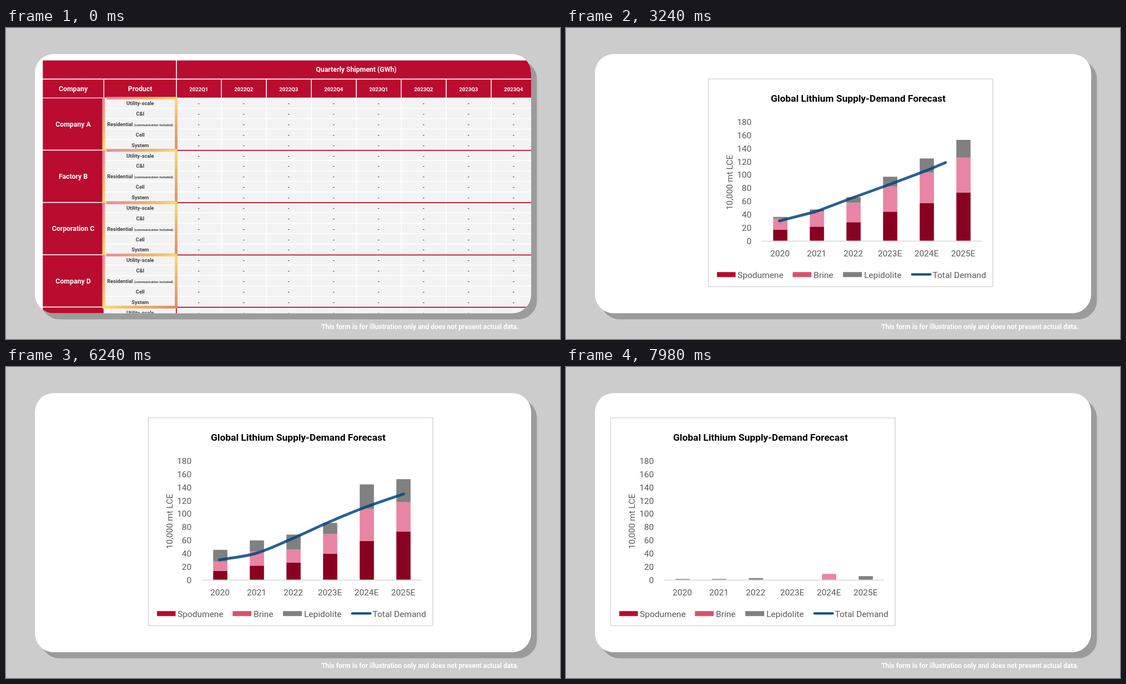
Recreate the animation shown at these times as an HTML page. Size 998x561 px, loop 8 s.

```html
<!DOCTYPE html>
<html lang="en">
<head>
<meta charset="utf-8">
<title>Report forms</title>
<style>
html, body { margin: 0; width: 100%; height: 100%; overflow: hidden; background: #ccc; }
svg { display: block; width: 100%; height: 100%; }
text { font-family: Roboto, "Open Sans", sans-serif; text-anchor: middle; }
.head { font-weight: 700; font-size: 12.3px; fill: #fff; }
.quarter { font-weight: 700; font-size: 9.6px; fill: #fff; }
.cell { font-weight: 700; font-size: 9.2px; fill: #404040; }
.note { font-size: 6px; }
.label { font-size: 15.5px; fill: #595959; }
.start { text-anchor: start; }
.end { text-anchor: end; }
</style>
</head>
<body>
<svg viewBox="0 0 998 561">
  <defs>
    <clipPath id="card"><rect x="52" y="47" width="894" height="467.5" rx="34"/></clipPath>
    <clipPath id="wipe"><rect id="wipeBox" x="0" y="0" width="998" height="561"/></clipPath>
    <linearGradient id="glow" x1="0" y1="0" x2="1" y2="1">
      <stop offset="0" stop-color="#e887a3"/>
      <stop offset=".3" stop-color="#f0b06b"/>
      <stop offset=".5" stop-color="#fbdb6c"/>
      <stop offset=".7" stop-color="#f2b565"/>
      <stop offset="1" stop-color="#e58a63"/>
    </linearGradient>
  </defs>
  <rect width="998" height="561" fill="#ccc"/>
  <rect x="62.5" y="58" width="894" height="467.5" rx="34" fill="#9b9b9b"/>
  <rect x="52" y="47" width="894" height="467.5" rx="34" fill="#fff"/>
  <text class="start" x="568" y="542.5" font-size="12.1" font-weight="700" fill="#fff">This form is for illustration only and does not present actual data.</text>
  <g clip-path="url(#card)">
    <g id="table" clip-path="url(#wipe)"></g>
    <g id="chart"></g>
  </g>
</svg>
<script>
const $ = id => document.getElementById(id);
const LOOP = 8000, STEP = 30;
const RED = '#b90c2f';

const rect = (x, y, w, h, fill) => `<rect x="${x}" y="${y}" width="${w}" height="${h}" fill="${fill}"/>`;
const text = (cls, x, y, str, attrs = '') => `<text class="${cls}" x="${x}" y="${y}" ${attrs}>${str}</text>`;

// ---- Table ----
const TOP = 126.6, BLOCK = 94.33, ROW = BLOCK / 5, COL = 81;
const companies = ['Company A', 'Factory B', 'Corporation C', 'Company D', ''];
const products = ['Utility-scale', 'C&amp;I',
  'Residential <tspan class="note">(communication included)</tspan>', 'Cell', 'System'];

function buildTable() {
  let s = rect(66.3, 58.5, 239.9, 32.8, RED) + rect(307.8, 58.5, 640, 32.8, RED)
    + rect(66.3, 93, 109.2, 32.6, RED) + rect(177, 93, 129.2, 32.6, RED)
    + text('head', 631, 79.3, 'Quarterly Shipment (GWh)')
    + text('head', 121, 114.3, 'Company') + text('head', 241.5, 114.3, 'Product');
  for (let c = 0; c < 8; c++) {
    const x = 307.8 + c * COL;
    s += rect(x, 93, COL - 1.6, 32.6, RED)
      + text('quarter', 347.3 + c * COL, 113.9, `${2022 + (c >> 2)}Q${c % 4 + 1}`);
  }
  companies.forEach((name, b) => {
    const y = TOP + b * BLOCK;
    s += rect(66.3, y + .2, 109.5, BLOCK - 1.6, RED) + text('head', 121, y + 51.2, name);
    products.forEach((product, r) => {
      const top = y + r * ROW, base = top + 12.7;
      s += rect(176.4, top, 130, ROW - 1.6, '#f3f3f3') + text('cell', 241.8, base, product);
      for (let c = 0; c < 8; c++) {
        s += rect(307.8 + c * COL, top, COL - 1.6, ROW - 1.6, '#f3f3f3')
          + text('cell', 347.3 + c * COL, base, '-', 'font-size="11"');
      }
    });
  });
  s += rect(306, 125.8, 1.8, 389, RED);
  for (let b = 1; b < 5; b++) s += rect(176, TOP + b * BLOCK - 1.1, 772, 1.8, RED);
  for (let b = 0; b < 4; b++) {
    s += `<path class="frame" d="M175.8 ${TOP + b * BLOCK}h130.7v93.9h-130.7z" pathLength="1"
      fill="none" stroke="url(#glow)" stroke-width="4.8"/>`;
  }
  $('table').innerHTML = s;
}

// ---- Chart ----
const BASE = 383.8, PITCH = 66;
const barColors = ['#8a0221', '#e885a4', '#808080'];
// Each state: three stacked segment heights, then the demand line's y values.
const first = {
  bars: [[20, 25.5, 33.5, 52.5, 68, 87], [20, 27, 35, 45.5, 55, 63], [3, 4, 10, 17.5, 25.5, 32]],
  line: [348, 331, 306, 282, 257, 229], bend: 0 };
const second = {
  bars: [[10, 33, 21, 72, 51, 102], [32, 27, 18.5, 25, 97.5, 41], [13, 13, 45, 6.5, 20.5, 26]],
  line: [348, 329, 304, 284, 260, 229], bend: 1 };
const third = {
  bars: [[16, 25.5, 31, 47, 70, 87], [17, 25.5, 23.5, 35.5, 58, 53], [21, 20, 27, 20, 44, 41.5]],
  line: [348, 336, 309, 279, 252, 229], bend: 1 };
const none = [0, 0, 0, 0, 0, 0];
const empty = { ...first, bars: [none, none, none] };
const low = { ...first, bars: [none, [0, 0, 0, 0, 10.5, 0], [1.5, 1.5, 3, 0, 0, 6.5]] };
const keys = [[0, empty], [2610, empty], [3060, first], [3450, first], [5160, second],
  [6240, third], [7470, first], [7680, first], [7980, low], [LOOP, low]];

function buildChart() {
  let s = '<rect x="256.4" y="91.7" width="512.4" height="374.8" fill="#fff" stroke="#d9d9d9" stroke-width="1.6"/>'
    + text('start', 369, 132.6, 'Global Lithium Supply-Demand Forecast', 'font-size="17.4" font-weight="700"')
    + text('label', 0, 0, '10,000 mt LCE', 'transform="translate(299.5 278.5) rotate(-90)"');
  for (let i = 0; i < 10; i++) s += text('label end', 334.3, 389.7 - i * 23.85, i * 20);
  for (let i = 0; i < 6; i++) {
    s += text('label', 385.5 + i * PITCH, 411.6, 2020 + i + (i > 2 ? 'E' : ''));
    for (const color of barColors) s += `<rect class="bar" x="${373.2 + i * PITCH}" width="25.6" fill="${color}"/>`;
  }
  s += rect(353, 383.7, 396, 1.6, '#d9d9d9')
    + rect(272, 440.3, 33.5, 9, '#b80a2b') + text('label start', 309, 450.6, 'Spodumene')
    + rect(408.3, 440.3, 33.8, 9, '#d9506e') + text('label start', 446, 450.6, 'Brine')
    + rect(499, 440.3, 34, 9, '#808080') + text('label start', 537, 450.6, 'Lepidolite')
    + '<path d="M623.5 444.6h33" stroke="#004a80" stroke-width="4" stroke-linecap="round"/>'
    + text('label start', 660.5, 450.6, 'Total Demand')
    + '<path id="demand" pathLength="1" fill="none" stroke="#004680" stroke-opacity=".85" stroke-width="5" stroke-linecap="round" stroke-linejoin="round"/>';
  $('chart').innerHTML = s;
}

// ---- Motion ----
const ramp = (t, a, b) => Math.min(1, Math.max(0, (t - a) / (b - a)));
const mix = (a, b, k) => a + (b - a) * k;
const smooth = u => u * u * (3 - 2 * u);

// cubic-bezier(.5, 0, .5, 1)
function easeStrong(u) {
  let lo = 0, hi = 1;
  for (let i = 0; i < 20; i++) {
    const s = (lo + hi) / 2;
    if (1.5 * s * (1 - s) + s ** 3 < u) lo = s; else hi = s;
  }
  return smooth(lo);
}

function curve(ys, bend) {
  const x = i => 384.5 + i * 66.3;
  const slope = i => (ys[Math.min(5, i + 1)] - ys[Math.max(0, i - 1)]) / (i % 5 ? 2 : 1);
  let d = `M${x(0)} ${ys[0]}`;
  for (let i = 0; i < 5; i++) {
    const chord = ys[i + 1] - ys[i];
    d += `C${x(i + 1 / 3)} ${ys[i] + mix(chord, slope(i), bend) / 3} `
      + `${x(i + 2 / 3)} ${ys[i + 1] - mix(chord, slope(i + 1), bend) / 3} ${x(i + 1)} ${ys[i + 1]}`;
  }
  return d;
}

function drawTable(t) {
  const erased = .012 + t * .000614 + t * t * 8.7e-8;
  for (const frame of frames) {
    frame.style.display = erased < .999 ? '' : 'none';
    frame.setAttribute('stroke-dasharray', '1 2');
    frame.setAttribute('stroke-dashoffset', -Math.min(1, erased));
  }
  $('wipeBox').setAttribute('width', mix(947, 66, easeStrong(ramp(t, 1620, 2040))));
}

function drawChart(t) {
  const k = keys.findIndex(([time], i) => i < keys.length - 1 && t < keys[i + 1][0]);
  const [t0, a] = keys[k], [t1, b] = keys[k + 1];
  const u = ramp(t, t0, t1), e = smooth(u);
  const lively = t > 3450 && t < 7470 ? .15 * Math.sin(Math.PI * u) : 0;

  for (let i = 0; i < 6; i++) {
    let y = BASE;
    for (let r = 0; r < 3; r++) {
      const sway = 1 + lively * Math.sin(4 * Math.PI * u + i + 2 * r);
      const h = mix(a.bars[r][i], b.bars[r][i], e) * sway;
      y -= h;
      bars[i * 3 + r].setAttribute('y', y);
      bars[i * 3 + r].setAttribute('height', h);
    }
  }

  const grown = 1 - (1 - ramp(t, 2850, 3420)) ** 2;
  const shown = grown - ramp(t, 7500, 7872) ** 2;
  const demand = $('demand');
  demand.style.display = shown > .002 ? '' : 'none';
  demand.setAttribute('d', curve(a.line.map((y, i) => mix(y, b.line[i], e)), mix(a.bend, b.bend, e)));
  demand.setAttribute('stroke-dasharray', `${shown} 2`);

  $('chart').setAttribute('transform', `translate(${-176 * smooth(ramp(t, 7680, 7980))} 0)`);
}

function render(now) {
  const t = Math.floor((now % LOOP) / STEP) * STEP;
  const onTable = t < 2040;
  $('table').style.display = onTable ? '' : 'none';
  $('chart').style.display = onTable ? 'none' : '';
  if (onTable) drawTable(t); else drawChart(t);
}

buildTable();
buildChart();
const frames = document.querySelectorAll('.frame');
const bars = document.querySelectorAll('.bar');
const begin = performance.now();
function tick() {
  render(performance.now() - begin);
  requestAnimationFrame(tick);
}
tick();
</script>
</body>
</html>
```
